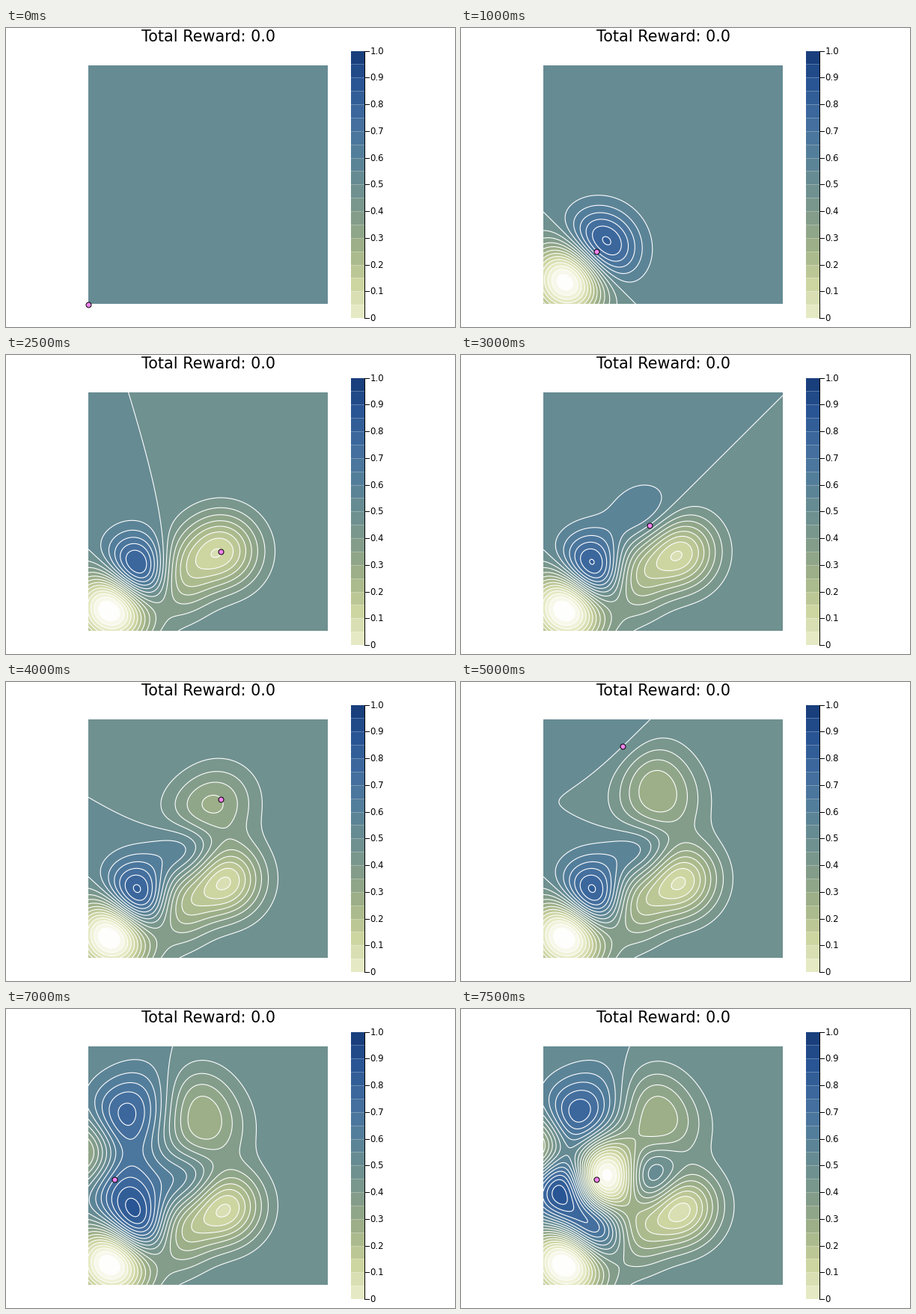
A matplotlib script for the animation above (8000 ms loop, 600 by 400 pixels).

```python
import numpy as np
import matplotlib.pyplot as plt
from matplotlib.animation import FuncAnimation
from matplotlib.colors import LinearSegmentedColormap, Normalize
from matplotlib.patches import Rectangle

DPI = 100
PX = 72 / DPI  # points per pixel
LEFT, RIGHT, TOP, BOTTOM = 110, 430, 50, 369
CELLS = 9
PRIOR = 0.5
STEP = 0.05

# Visited cells with the value measured there: x, y, value
SAMPLES = np.array([
    (1, 1, -.1), (2, 2, .7), (3, 2, .4), (4, 2, .2), (5, 3, .1),
    (4, 4, .5), (4, 5, .4), (5, 6, .3), (4, 7, .3), (3, 8, .5),
    (2, 7, .7), (1, 6, .7), (0, 5, .3), (1, 4, .7), (2, 4, 0),
])

CMAP = LinearSegmentedColormap.from_list("sea", [
    "#fefefc", "#ecefcd", "#ccd4a0", "#a3b488", "#839d8a",
    "#6a8e91", "#537e9b", "#406c9f", "#295594", "#163a78"])
NORM = Normalize(-0.125, 1)

LEVELS = np.arange(-5, 23) * STEP
# The untouched prior belongs to the band above it
LEVELS[LEVELS == PRIOR] = np.nextafter(PRIOR, 0)


def to_px(x, y):
    return (LEFT + x * (RIGHT - LEFT) / CELLS,
            BOTTOM - y * (BOTTOM - TOP) / CELLS)


def kernel(a, b):
    d = a[:, None, :] - b[None, :, :]
    return np.exp(-(d ** 2).sum(-1) / 2)


axis = np.linspace(0, CELLS, 181)
GX, GY = np.meshgrid(axis, axis)
GRID = np.column_stack([GX.ravel(), GY.ravel()])
PX_X, PX_Y = to_px(GX, GY)


def posterior(n):
    """Gaussian process mean after the first n samples."""
    pts, values = SAMPLES[:n, :2], SAMPLES[:n, 2]
    weights = np.linalg.solve(kernel(pts, pts), values - PRIOR)
    return (PRIOR + kernel(GRID, pts) @ weights).reshape(GX.shape)


fig = plt.figure(figsize=(6, 4), dpi=DPI, facecolor="white")
ax = fig.add_axes([0, 0, 1, 1])
ax.set_axis_off()


def draw_colorbar(x0=460.5, x1=478.5, y0=388, y1=30.5):
    h = (y0 - y1) * STEP
    for i in range(20):
        y = y0 - i * h
        ax.add_patch(Rectangle((x0, y - h), x1 - x0, h, lw=0,
                               fc=CMAP(NORM((i + 0.5) * STEP))))
        ax.plot([x0, x1], [y, y], color="white", lw=PX, alpha=0.25)
    ax.plot([x1, x1], [y0, y1], color="black", lw=PX)
    for i in range(11):
        y = y0 - 2 * i * h
        ax.plot([x1, x1 + 6], [y, y], color="black", lw=PX)
        ax.text(x1 + 8, y + 4.2, f"{i / 10:.1f}" if i else "0",
                fontsize=11.6 * PX, family="DejaVu Sans")


draw_colorbar()
ax.text(270.5, 18.3, "Total Reward: 0.0", fontsize=20.8 * PX,
        family="DejaVu Sans", ha="center")
agent, = ax.plot([], [], "o", ms=7 * PX, mfc="#f582ee", mec="black",
                 mew=PX, zorder=5)
layers = []


def update(i):
    while layers:
        layers.pop().remove()
    z = posterior(i)
    layers.append(ax.contourf(PX_X, PX_Y, z, LEVELS, cmap=CMAP, norm=NORM,
                              zorder=1))
    if i:
        layers.append(ax.contour(PX_X, PX_Y, z, LEVELS, colors="white",
                                 linewidths=1.1 * PX, linestyles="solid",
                                 zorder=2))
    x, y = to_px(*(SAMPLES[i - 1, :2] if i else (0, 0)))
    agent.set_data([x - 0.4], [y + 0.6])
    ax.set_xlim(0, 600)
    ax.set_ylim(400, 0)
    return [agent]


anim = FuncAnimation(fig, update, frames=len(SAMPLES) + 1, interval=500,
                     init_func=lambda: update(0), repeat=True, repeat_delay=0)
plt.show()
```
